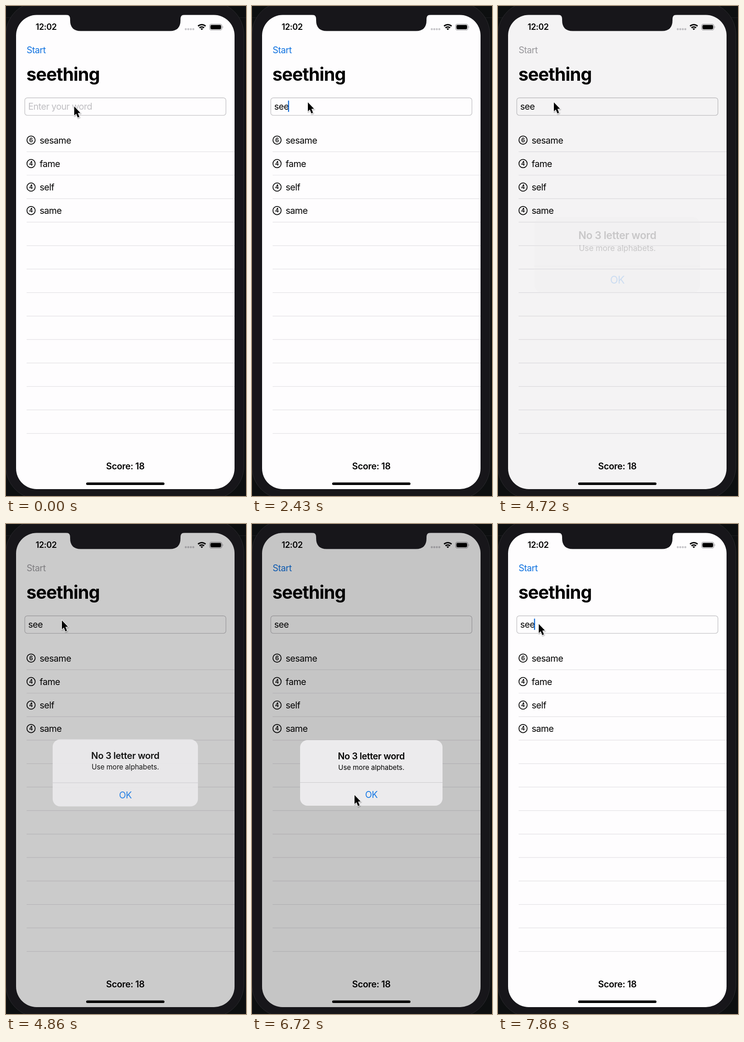
Write an HTML page that moves like this. It is 524x1068 px and loops after 8 s.

```html
<!DOCTYPE html>
<html lang="en">
<head>
<meta charset="utf-8">
<title>Word game</title>
<style>
  html, body { margin: 0; width: 100%; height: 100%; overflow: hidden; background: #0d0f10; }
  svg { display: block; width: 524px; height: 1068px; }
  text { font: 19.6px Inter, "Open Sans", sans-serif; letter-spacing: -.026em; }
  .semi { font-weight: 600; letter-spacing: -.017em; }
  .mid { text-anchor: middle; }
  #title { font-size: 39.2px; font-weight: 700; letter-spacing: -.024em; }
  #clock { font-size: 18px; }
  #message { font-size: 15px; letter-spacing: -.006em; }
  .digit { font-size: 12.5px; letter-spacing: 0; }
</style>
</head>
<body>
<svg viewBox="0 0 524 1068">
  <rect width="524" height="1068" fill="#0d0f10"/>
  <path d="M0 25.5H524" stroke="#1d1e20"/>
  <rect x="-.5" y="-9" width="520" height="1084" rx="72" fill="#17161a" stroke="#2a2a2d"/>
  <rect x="22" y="19.5" width="477" height="1033.5" rx="45" fill="#fefdfe"/>

  <text id="clock" class="semi mid" x="87.7" y="52">12:02</text>
  <g fill="#c5c4c8">
    <circle cx="392.5" cy="50.5" r="2.2"/><circle cx="398" cy="50.5" r="2.2"/>
    <circle cx="403.5" cy="50.5" r="2.2"/><circle cx="409" cy="50.5" r="2.2"/>
  </g>
  <g fill="none" stroke="#000" stroke-width="2.9">
    <path d="M419.3 43.9a12 12 0 0 1 16.4 0M422.5 47.6a7.3 7.3 0 0 1 10 0"/>
    <path d="M427.5 52.6l-2.7-2.9a4 4 0 0 1 5.4 0z" fill="#000" stroke="none"/>
  </g>
  <rect x="444.5" y="39.5" width="27" height="13" rx="4" fill="none" stroke="#8d8c90" stroke-width="1.1"/>
  <rect x="446.3" y="41.3" width="23.4" height="9.4" rx="2.4"/>
  <path d="M473 43.8q2 2.2 0 4.4z" fill="#8d8c90"/>

  <text id="start" x="45" y="103">Start</text>
  <text id="title" x="44.5" y="163">seething</text>
  <rect x="41" y="200.2" width="439.2" height="38.2" rx="5.5" fill="#fefdfe" stroke="#c6c5c8" stroke-width="1.4"/>
  <text id="entry" x="48.5" y="225.5"></text>
  <rect id="caret" y="206" width="2.4" height="25" rx="1.2" fill="#1a70d8"/>
  <g id="list"></g>
  <text class="semi mid" x="260.5" y="1009.5">Score: 18</text>

  <rect id="dim" x="22" y="19.5" width="477" height="1033.5" rx="45"/>
  <path d="M131 19q9 0 9 9v3q0 23.5 23 23.5H358q23 0 23-23.5v-3q0-9 9-9z" fill="#17161a"/>
  <rect x="175" y="1038.5" width="171" height="5.6" rx="2.8"/>

  <g id="alert">
    <rect x="105" y="471" width="311" height="143" rx="16" fill="#ecebed"/>
    <path d="M105 563.5H416" stroke="#cbcacd"/>
    <text class="semi mid" x="260.5" y="512.5">No 3 letter word</text>
    <text id="message" class="mid" x="260.5" y="535.5">Use more alphabets.</text>
    <text class="mid" x="260.5" y="596.5" fill="#1578e6">OK</text>
  </g>

  <g id="pointer" stroke-linejoin="round">
    <path id="arrow" d="M0 0V19.5L4.3 15.7 7.6 24 11.2 22.5 7.8 14.3 13.4 14z" transform="translate(.8 1.8)"
          fill="#0003" stroke="#0002" stroke-width="4"/>
    <path d="M0 0V19.5L4.3 15.7 7.6 24 11.2 22.5 7.8 14.3 13.4 14z" stroke="#fff" stroke-width="2.2" paint-order="stroke"/>
  </g>
</svg>
<script>
const $ = id => document.getElementById(id);
const clamp = v => Math.max(0, Math.min(1, v));
const TICK = 1000 / 7, LOOP = 8000;

// list rows and separators
const words = ['sesame', 'fame', 'self', 'same'];
let rows = '';
for (let i = 0; i < 13; i++) {
  const y = 51.17 * i, word = words[i];
  rows += `<path d="M45 ${317.6 + y}H499" stroke="#e3e2e5" stroke-width="1.2"/>`;
  if (word) rows += `<circle cx="54.7" cy="${292.3 + y}" r="9" fill="none" stroke="#000" stroke-width="1.7"/>
    <text class="semi mid digit" x="54.7" y="${296.9 + y}">${word.length}</text>
    <text x="73.5" y="${299.5 + y}">${word}</text>`;
}
$('list').innerHTML = rows;

// pointer path: time, x, y
const path = [
  [0, 149, 219], [143, 149, 219], [286, 138, 217], [429, 126, 212], [571, 122, 210],
  [5714, 122, 210], [5857, 165, 300], [6000, 256, 560], [6143, 224, 591],
  [6714, 224, 591], [6857, 135, 432], [7000, 101, 290], [7143, 91, 235], [7571, 89, 218], [8000, 89, 218]
];
function pointerAt(t) {
  const i = path.findIndex(p => p[0] > t);
  const [t0, x0, y0] = path[i - 1], [t1, x1, y1] = path[i];
  const k = (t - t0) / (t1 - t0);
  return [x0 + (x1 - x0) * k, y0 + (y1 - y0) * k];
}

// entry states: time, text, caret x
const typing = [[850, '', 48.6], [1990, 's', 58.4], [2280, 'se', 68.6], [2420, 'see', 78.6], [7850, 'see', 78.6]];

// caret fades out and back once a second
function blink(s) {
  const u = (s + 40) % 1000;
  return Math.min(s < 150 ? 1 : clamp(u / 150), clamp((640 - u) / 220));
}

// critically damped spring from 0 to 1
function spring(ms) {
  const x = Math.max(0, ms) * .022;
  return 1 - (1 + x) * Math.exp(-x);
}

const OPEN = 4680, CLOSE = 6712;

function draw(t) {
  const state = typing.filter(s => s[0] <= t).pop();
  const text = state ? state[1] : '';
  $('entry').textContent = text || 'Enter your word';
  $('entry').setAttribute('fill', text ? '#000' : '#bfbec2');

  const focused = state && (t < OPEN || t > 7850);
  $('caret').setAttribute('opacity', focused ? blink(t - state[0]) : 0);
  if (state) $('caret').setAttribute('x', state[2]);

  const shown = spring(t - OPEN), alpha = shown * (1 - spring(t - CLOSE));
  const scale = 1.2 - .2 * shown;
  $('start').setAttribute('fill', t > OPEN && t < CLOSE ? '#9c9b9f' : '#0f72e0');
  $('dim').setAttribute('opacity', .224 * alpha);
  $('alert').setAttribute('opacity', alpha);
  $('alert').setAttribute('transform',
    `translate(260.5 542.5) scale(${scale}) translate(-260.5 -542.5)`);
  $('pointer').setAttribute('transform', `translate(${pointerAt(t)})`);
}

function loop() {
  const t = performance.now() % LOOP;
  draw(Math.min(55, Math.floor((t + 2) / TICK)) * TICK);
  requestAnimationFrame(loop);
}
loop();
</script>
</body>
</html>
```
